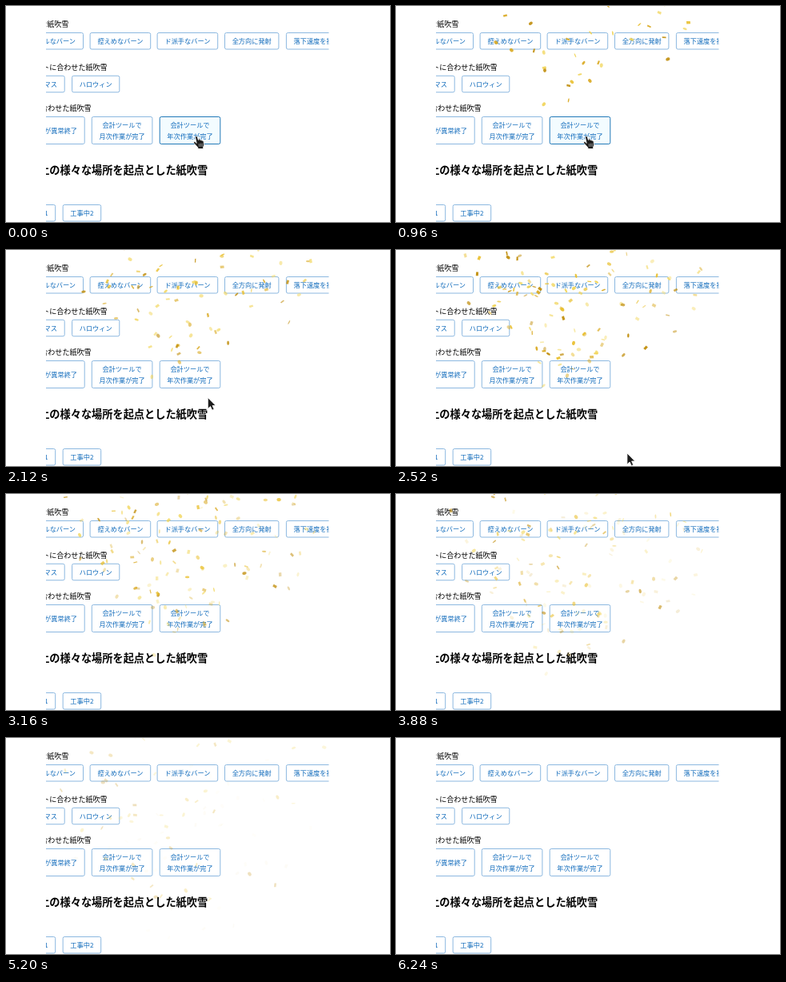
An HTML page that plays this animation: 480 by 270 pixels, repeating every 6.76 s.

```html
<!DOCTYPE html>
<html lang="ja">
<head>
<meta charset="utf-8">
<title>紙吹雪</title>
<style>
  html, body { margin: 0; width: 100%; height: 100%; overflow: hidden; background: #fff; }
  svg { display: block; width: 480px; height: 270px; }
  text { font-family: "Noto Sans CJK JP", "Noto Sans CJK", sans-serif; font-weight: 500; }
  .label { font-size: 9.05px; text-anchor: end; fill: #000; }
  .title { font-size: 13.2px; font-weight: 900; text-anchor: end; fill: #000; }
  .button text { font-size: 8.2px; text-anchor: middle; fill: #0f6abb; }
  .button rect { fill: #fff; stroke: #8cb8e0; stroke-width: 1; }
  .button.hover rect { fill: #f3fcff; stroke: #2279b8; }
</style>
</head>
<body>
<svg viewBox="0 0 480 270">
  <clipPath id="page"><rect x="50" width="353.5" height="270"/></clipPath>
  <g clip-path="url(#page)">
    <g id="content"></g>
    <g id="confetti"></g>
    <g id="cursor" stroke-linejoin="round" stroke-linecap="round">
      <path id="arrow" d="M0 0V13.6L3.2 10.7L5.4 15.4L7.8 14.3L5.7 9.7H9.6Z" fill="#1c1c1c" stroke="#fff" stroke-width=".8"/>
      <g id="hand">
        <path d="M-1.4 1.1Q-.9-.4.5.2Q1 .5 1.3 1.4L2.5 5.2Q4 0 4.7 5Q6.1 4.2 6.8 5.6Q8.7 5.1 9.1 7.2L9.5 10.6Q9.4 12.6 8.6 13.7V16H1.9V14.4L-2.9 9.2Q-4.2 7.5-2.6 7Q-1.5 6.9 0 8.7Z" fill="#1c1c1c" stroke="#fff" stroke-width=".8"/>
        <path d="M3.3 9.8L3.6 13M5.4 9.6L5.6 13M7.3 9.5V12.8" stroke="#ddd" stroke-width=".6"/>
      </g>
    </g>
  </g>
</svg>
<script>
const LOOP = 6760, STEP = 40;
const LIFE = 4000, DRAG = 170, FALL = 0.036;
const ORIGIN = { x: 229, y: 260 };
const BURSTS = [500, 1350, 2230];
const PER_BURST = 46;
const GOLDS = ['#c08c08', '#d9a71c', '#e9bf2e', '#f1d455', '#f4dc74'];

const byId = id => document.getElementById(id);
const clamp01 = v => Math.min(1, Math.max(0, v));
const mix = (a, b, k) => a + (b - a) * k;

function add(parent, tag, attrs, text = '') {
  const node = document.createElementNS('http://www.w3.org/2000/svg', tag);
  for (const key in attrs) node.setAttribute(key, attrs[key]);
  node.textContent = text;
  return parent.appendChild(node);
}

function seeded(seed) {
  return () => {
    seed = (seed + 0x6D2B79F5) | 0;
    let h = Math.imul(seed ^ (seed >>> 15), 1 | seed);
    h = (h + Math.imul(h ^ (h >>> 7), 61 | h)) ^ h;
    return ((h ^ (h >>> 14)) >>> 0) / 4294967296;
  };
}

// Width in ems: digits are narrower than Japanese characters.
const ems = line => [...line].reduce((sum, c) => sum + (/\d/.test(c) ? 0.58 : 1), 0);

// Buttons are sized by their right edge and longest line.
function button(right, top, lines, tall = lines.length > 1) {
  const width = Math.max(...lines.map(ems)) * 8.2 + 18.2;
  const height = tall ? 34 : 20.5;
  const group = add(byId('content'), 'g', { class: 'button' });
  add(group, 'rect', { x: right - width, y: top, width, height, rx: 2 });
  lines.forEach((line, i) => add(group, 'text', {
    x: right - width / 2,
    y: top + height / 2 + 3.1 + (i - (lines.length - 1) / 2) * 14
  }, line));
  return group;
}

function heading(right, y, text, type = 'label') {
  add(byId('content'), 'text', { class: type, x: right, y }, text);
}

heading(78.4, 26.4, '様々な紙吹雪');
button(96.5, 33.5, ['シンプルなバーン']);
button(180.7, 33.5, ['控えめなバーン']);
button(264.7, 33.5, ['ド派手なバーン']);
button(340.9, 33.5, ['全方向に発射']);
button(426, 33.5, ['落下速度を操作']);

heading(126.6, 80.2, 'イベントに合わせた紙吹雪');
button(73.2, 87.3, ['クリスマス']);
button(141.8, 87.3, ['ハロウィン']);

heading(106.6, 131.4, '業務に合わせた紙吹雪');
button(98.2, 138.5, ['処理が異常終了'], true);
button(182.9, 138.5, ['会計ツールで', '月次作業が完了']);
const yearly = button(267.8, 138.5, ['会計ツールで', '年次作業が完了']);

heading(252.2, 210, '画面上の様々な場所を起点とした紙吹雪', 'title');
button(61.7, 248.5, ['工事中1']);
button(118.7, 248.5, ['工事中2']);

const random = seeded(20);
const pieces = BURSTS.flatMap(start => Array.from({ length: PER_BURST }, () => {
  const round = random() < 0.6;
  const shape = round
    ? { d: 'M-2.7 0A2.7 2.3 0 0 1 2.7 0A2.7 2.3 0 0 1-2.7 0Z' }
    : { d: 'M-2.6-1.7L2.2-2L2.6 1.7L-2.2 2Z' };
  return {
    start,
    node: add(byId('confetti'), 'path', { ...shape, fill: GOLDS[Math.floor(random() * GOLDS.length)] }),
    slope: (random() + random() - 1) * 0.62,
    reach: 165 + 205 * random(),
    fall: FALL * (0.85 + 0.3 * random()),
    phase: random() * 6.28,
    wobble: 0.003 + 0.003 * random(),
    spin: random() * 360
  };
}));

function drawPiece(p, t) {
  const age = t - p.start;
  const visible = age > 0 && age < LIFE;
  p.node.setAttribute('visibility', visible ? 'visible' : 'hidden');
  if (!visible) return;
  const travel = p.reach * (1 - Math.exp(-age / DRAG));
  const sway = p.phase + age * p.wobble;
  const x = ORIGIN.x + p.slope * travel + 4 * Math.cos(sway);
  const y = ORIGIN.y - travel + p.fall * age + 3 * Math.sin(sway);
  const squash = 0.3 + 0.6 * Math.abs(Math.sin(sway * 1.7));
  const turn = p.spin + age * 0.12;
  p.node.setAttribute('transform',
    `translate(${x.toFixed(2)} ${y.toFixed(2)}) rotate(${turn.toFixed(1)}) scale(1 ${squash.toFixed(2)})`);
  p.node.setAttribute('opacity', (1 - age / LIFE).toFixed(3));
}

function drawCursor(t) {
  const nudge = clamp01((t - 1000) / 400);
  const leave = clamp01((t - 1960) / 480);
  const ease = leave * leave * (3 - 2 * leave);
  const exit = clamp01((t - 2520) / 160);
  const x = mix(238 + 1.5 * nudge, 288.9, ease) + 4 * exit;
  const y = mix(162.5 - 2 * nudge, 254.3, ease) + 20 * exit;
  const hover = y < 173;
  byId('cursor').setAttribute('transform', `translate(${x} ${y})`);
  byId('cursor').setAttribute('visibility', exit < 1 ? 'visible' : 'hidden');
  byId('hand').setAttribute('display', hover ? 'inline' : 'none');
  byId('arrow').setAttribute('display', hover ? 'none' : 'inline');
  yearly.classList.toggle('hover', hover);
}

function render(time) {
  const t = Math.floor((time % LOOP) / STEP) * STEP;
  // The scene rests until the first burst is under way.
  pieces.forEach(p => drawPiece(p, t < 520 ? 0 : t));
  drawCursor(t);
}

const began = performance.now();
function tick() {
  render(performance.now() - began);
  requestAnimationFrame(tick);
}
tick();
</script>
</body>
</html>
```
